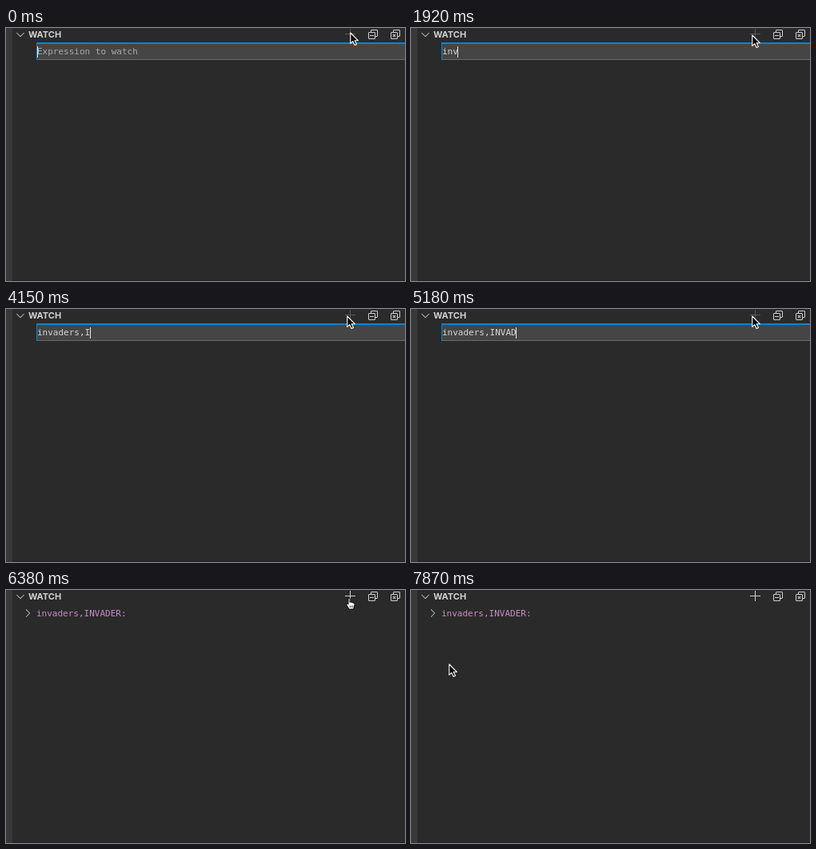
An HTML page with a canvas that plays this animation: 499 by 317 pixels, repeating every 8000 ms.

```html
<!DOCTYPE html>
<html lang="en">
<head>
<meta charset="utf-8">
<title>Watch panel</title>
<style>
  html, body { margin: 0; width: 100%; height: 100%; overflow: hidden; background: #2a2a2a; }
  canvas { display: block; width: 499px; height: 317px; }
</style>
</head>
<body>
<canvas id="stage" width="499" height="317"></canvas>
<script>
const ctx = document.getElementById('stage').getContext('2d');
const LOOP = 8000;
const SUBMIT = 6380;
const MONO = '11px "DejaVu Sans Mono", monospace';
const CHAR_W = 6.62;
const EXPR = 'invaders,INVADER';

// Time of each key press; the last two letters arrive together.
const keys = [1620, 1770, 1920, 2220, 2520, 2670, 2800, 3100, 3400,
              4150, 4450, 4740, 5040, 5180, 5480, 5480];
const caretOff = [[440, 880], [3850, 4150], [6080, SUBMIT]];

// Pointer stops: time, x, y, shape.
const stops = [
  [0, 430, 5, 'arrow'], [440, 428, 7, 'arrow'], [590, 426, 8, 'arrow'],
  [6230, 425, 9, 'hand'], [7280, 411, 28, 'arrow'], [7430, 350, 74, 'arrow'],
  [7580, 240, 97, 'arrow'], [7720, 98, 100, 'arrow'], [7870, 47, 92, 'arrow']
];

const frame = 'M5 3l1-1h7l1 1v7l-1 1h-2v2l-1 1H3l-1-1V6l1-1h2V3zm1 2h4l1 1v4h2V3H6v2zm4 1H3v7h7V6z';
const shapes = {
  add: 'M14 7v1H8v6H7V8H1V7h6V1h1v6h6z',
  collapse: 'M9 9H4v1h5V9z' + frame,
  clear: 'M8.62 8.09l-.71-.71L6.5 8.79 5.09 7.38l-.71.71L5.79 9.5l-1.41 1.41.71.71L6.5 10.21l1.41 1.41.71-.71L7.21 9.5z' + frame,
  down: 'M7.976 10.072l4.357-4.357.62.618L8.284 11h-.618L3 6.333l.619-.618z',
  right: 'M10.072 8.024L5.715 3.667l.618-.62L11 7.716v.618L6.333 13l-.618-.619z',
  arrow: 'M.8 1V14.4L3.8 11.6 6.1 16.6 8.5 15.5 6.2 10.7H10.3z',
  hand: 'M3 8.8V2Q4 .3 5.1 2V6.2Q6.6 5.2 7.2 6.6 8.6 5.8 9.2 7.2 10.9 6.7 11.1 8.7L10.6 12 9.6 15H4L2.2 12 .5 9.4Q1 7.6 3 8.8z',
  knuckles: 'M5.2 10.4v2.8M7 10.4v2.8M8.8 10.4v2.8'
};
for (const name in shapes) shapes[name] = new Path2D(shapes[name]);

function at(x, y, draw) {
  ctx.save();
  ctx.translate(x, y);
  draw();
  ctx.restore();
}

function icon(name, x, y, color) {
  at(x, y, () => {
    ctx.fillStyle = color;
    ctx.fill(shapes[name], 'evenodd');
  });
}

function rect(color, x, y, w, h) {
  ctx.fillStyle = color;
  ctx.fillRect(x, y, w, h);
}

function text(str, x, y, font, color) {
  ctx.font = font;
  ctx.fillStyle = color;
  ctx.fillText(str, x, y);
}

function header(editing) {
  icon('down', 10, 0, '#c5c5c5');
  text('WATCH', 28, 12, 'bold 11px Inter, sans-serif', '#d2d2d2');
  icon('add', 423, 0, editing ? '#595959' : '#d0d0d0');
  icon('collapse', 451, 0, '#d0d0d0');
  icon('clear', 479, 0, '#d0d0d0');
}

function input(t) {
  rect('#454545', 38, 18, 461, 22);
  rect('#6b6b6b', 38, 39, 461, 1);
  rect('#0a84d2', 38, 18, 461, 2);
  rect('#0a84d2', 38, 18, 1, 22);

  const count = keys.filter(k => k <= t).length;
  if (count) text(EXPR.slice(0, count), 39, 33, MONO, '#d6d6d6');
  else text('Expression to watch', 39, 33, MONO, '#aaaaaa');

  if (!caretOff.some(([from, to]) => t >= from && t < to)) {
    rect('#e6e6e6', Math.floor(39 + count * CHAR_W), 23, 1, 14);
  }
}

function result() {
  icon('right', 19, 21, '#c5c5c5');
  text(EXPR + ':', 38, 33, MONO, '#cb8bc8');
}

function pointer(t) {
  const [, x, y, shape] = stops.filter(s => s[0] <= t).pop();
  const hand = shape === 'hand';
  at(x, y, () => {
    ctx.lineJoin = 'round';
    ctx.lineWidth = 1.1;
    ctx.fillStyle = hand ? '#fff' : '#050505';
    ctx.strokeStyle = hand ? '#111' : '#fff';
    ctx.fill(shapes[shape]);
    ctx.stroke(shapes[shape]);
    if (hand) {
      ctx.lineWidth = 0.7;
      ctx.stroke(shapes.knuckles);
    }
  });
}

function draw(now) {
  const t = now % LOOP;
  const editing = t < SUBMIT;
  rect('#2a2a2a', 0, 0, 499, 317);
  rect('#383838', 0, 0, 8, 317);
  rect('#222222', 8, 316, 491, 1);
  header(editing);
  if (editing) input(t);
  else result();
  pointer(t);
}

const start = performance.now();
function tick() {
  draw(performance.now() - start);
  requestAnimationFrame(tick);
}
tick();
</script>
</body>
</html>
```
